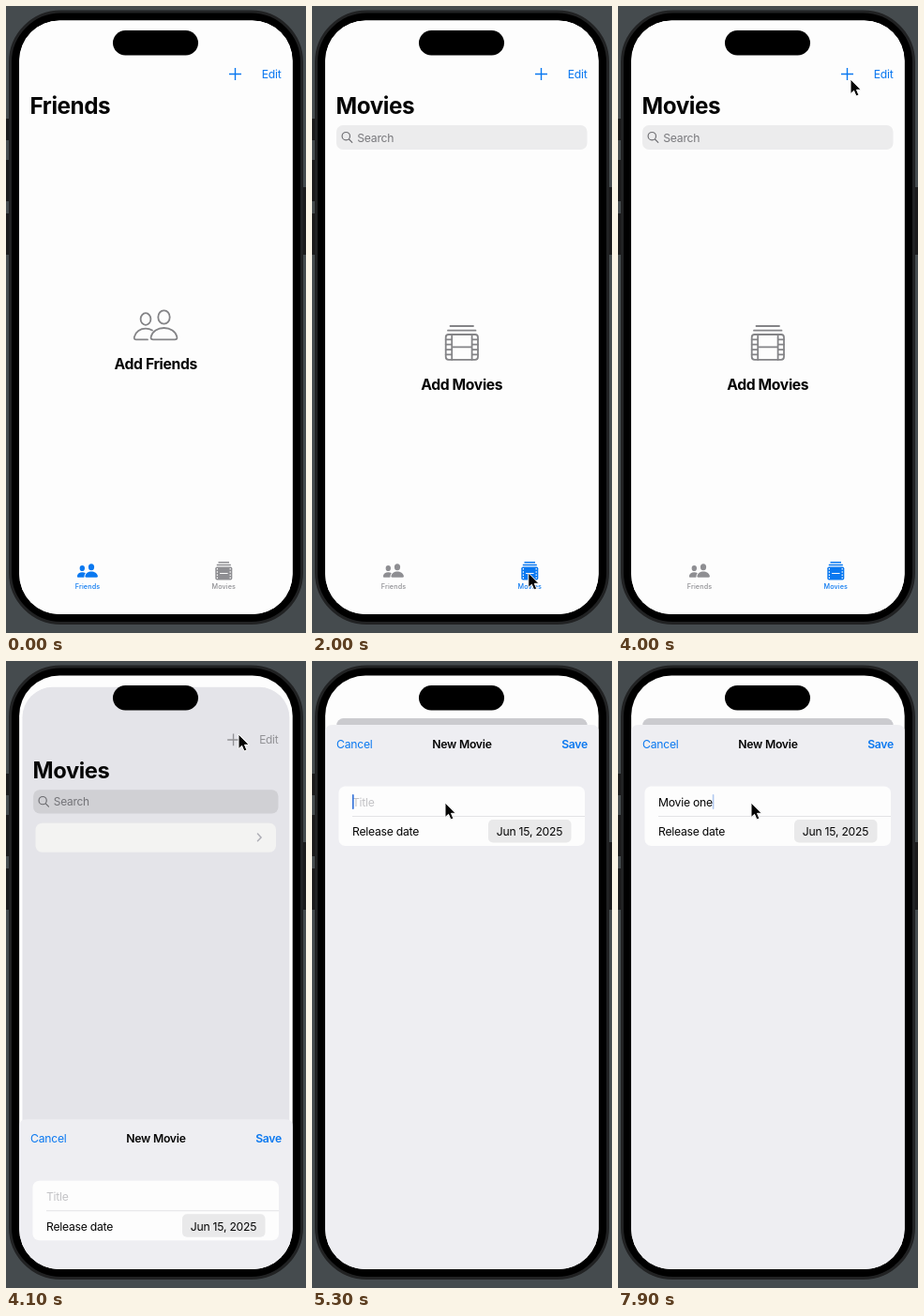
Write an HTML page that moves like this. It is 320x668 px and loops after 8000 ms.

```html
<!DOCTYPE html>
<html lang="en">
<head>
<meta charset="utf-8">
<title>Movie list</title>
<style>
  html, body { margin: 0; width: 100%; height: 100%; overflow: hidden; background: #454b4e; }
  svg { display: block; width: 320px; height: 668px; }
  text { font-family: Inter, Roboto, sans-serif; font-size: 12.2px; letter-spacing: -.25px; fill: #050505; white-space: pre; }
  .title { font-size: 24.3px; font-weight: 700; letter-spacing: -.45px; }
  .empty { font-size: 15.7px; font-weight: 700; letter-spacing: -.35px; text-anchor: middle; }
  .tab { font-size: 7.2px; font-weight: 500; letter-spacing: .12px; text-anchor: middle; fill: inherit; }
  .bold { font-weight: 600; }
  .mid { text-anchor: middle; }
  .end { text-anchor: end; }
  .link { fill: #0a78f0; }
  .line { fill: none; stroke: #848487; stroke-width: 1.8; stroke-linecap: round; stroke-linejoin: round; }
</style>
</head>
<body>
<svg viewBox="0 0 320 668">
  <defs>
    <clipPath id="screen"><rect x="14.1" y="15.5" width="291.6" height="632.5" rx="43"/></clipPath>
  </defs>

  <rect width="320" height="668" fill="#454b4e"/>
  <g fill="#1b1b1c">
    <rect y="120" width="6" height="23"/>
    <rect y="164" width="6" height="44"/>
    <rect y="221" width="6" height="44"/>
    <rect x="314" y="193" width="6" height="72"/>
  </g>
  <rect x="4.5" y="6" width="311" height="651.5" rx="54" fill="#000" stroke="#212223" stroke-width="3"/>

  <g clip-path="url(#screen)">
    <rect x="14" y="15" width="292" height="636" fill="#fdfdfd"/>
    <g id="home">
      <rect id="card" x="14.1" y="15" width="291.6" height="640"/>
      <g id="tools">
        <path d="M238 72.5h13M244.5 66v13" stroke="currentColor" stroke-width="1.4"/>
        <text x="293.5" y="77" class="end" style="fill:currentColor">Edit</text>
      </g>
      <text id="heading" class="title" x="25.5" y="115"></text>

      <g id="friends">
        <g class="line">
          <ellipse cx="168.5" cy="331.5" rx="6.2" ry="7.2"/>
          <path d="M157 355.4q-3 0-2.3-3c1.3-6 7.3-9.4 13.8-9.4s12.5 3.4 13.8 9.4q.7 3-2.3 3z"/>
          <ellipse cx="149" cy="333.5" rx="5.4" ry="6.3"/>
          <path d="M151 355.4H139q-2.8 0-2.1-3c1.3-5.6 6.4-8.7 12.1-8.7 2.7 0 5 .6 7 1.8"/>
        </g>
        <text class="empty" x="159.7" y="387">Add Friends</text>
      </g>

      <g id="movies">
        <rect id="search" x="26" y="127" width="267.5" height="26" rx="7"/>
        <g fill="none" stroke="#707074" stroke-width="1.2" stroke-linecap="round">
          <circle cx="36.3" cy="138.7" r="4.2"/>
          <path d="M39.5 142l3.300 3.400"/>
        </g>
        <text x="48.3" y="144.5" style="fill:#78787c">Search</text>
        <g id="none">
          <g class="line">
            <path d="M147.5 341h24.5M145 345.7h29.5"/>
            <rect x="142.7" y="350" width="34.3" height="26.8" rx="3"/>
            <path id="film"/>
          </g>
          <text class="empty" x="159.7" y="409">Add Movies</text>
        </g>
        <g id="row">
          <rect x="28.5" y="163.5" width="262.5" height="31.5" rx="7" fill="#fefefd"/>
          <path d="M271 175l3.7 3.9-3.7 3.9" fill="none" stroke="#b6b6be" stroke-width="1.5" stroke-linecap="round"/>
        </g>
      </g>

      <g id="tabFriends">
        <ellipse cx="91" cy="597.7" rx="3.1" ry="3.5"/>
        <path d="M85.8 608.8q-1.5 0-1.3-1.5c.5-3 3.2-4.7 6.5-4.7s6.3 1.7 6.8 4.7q.2 1.5-1.3 1.5z"/>
        <ellipse cx="81.3" cy="599" rx="2.7" ry="3.1"/>
        <path d="M83.3 608.8H77q-1.3 0-1.1-1.5c.5-2.6 2.6-4 5.4-4q2 0 3.5.9-1.7 1.8-1.5 4.6z"/>
        <text class="tab" x="87" y="620.8">Friends</text>
      </g>
      <g id="tabMovies">
        <path d="M226.5 592h11.5v1.4h-11.5zM224.8 594.7h15v1.5h-15z"/>
        <rect x="223.3" y="597.5" width="18" height="14" rx="1.8"/>
        <path d="M228 604.5h8.6" stroke="#fdfdfd" stroke-width="1"/>
        <path d="M225.4 599v11.5M239.2 599v11.5" stroke="#fdfdfd" stroke-width="1.2" stroke-dasharray="1.5 1.7"/>
        <text class="tab" x="232.3" y="620.8">Movies</text>
      </g>
      <rect id="dim" x="14.1" y="15" width="291.6" height="640"/>
    </g>

    <g id="sheet">
      <path d="M14 700V8q0-8 8-8h276q8 0 8 8v692z" fill="#eeeef2"/>
      <text class="link" x="26" y="24.8">Cancel</text>
      <text class="bold mid" x="160" y="24.8">New Movie</text>
      <text class="bold end link" x="294" y="24.8">Save</text>
      <rect x="28.5" y="65.5" width="262.5" height="63.5" rx="7" fill="#fdfdfd"/>
      <path d="M43 97.5h248" stroke="#dedee1" stroke-width=".8"/>
      <text id="entry" x="43" y="86.5"></text>
      <rect id="caret" y="74" width="1.6" height="16" rx=".8" fill="#2f6fd8"/>
      <text x="43" y="118.3">Release date</text>
      <rect x="188" y="101" width="88.5" height="24.5" rx="5" fill="#e9e9ea"/>
      <text class="mid" x="232" y="118.3">Jun 15, 2025</text>
    </g>
  </g>

  <rect x="114" y="26" width="91" height="26.5" rx="13.25"/>
  <path id="pointer" d="M0 0V15.6L3.6 12.3 6 18 8.9 16.8 6.5 11.3H11.2Z" fill="#050505" stroke="#fdfdfd" stroke-width="1"/>
</svg>

<script>
const LOOP = 8000, TAB_AT = 1600, SHEET_AT = 4044, FOCUS_AT = 5300;
const BLUE = '#0a78f0', GREY = '#8e8e92';
const keys = [
  [600, 175, 672], [1100, 215, 613], [1450, 230, 604], [2100, 231, 604],
  [3200, 246, 134], [3700, 248, 78], [4350, 248, 78], [5150, 142, 151]
];
const typing = [6400, 6500, 6600, 6700, 6800, 7200, 7200, 7300, 7400];
const word = 'Movie one';

const $ = id => document.getElementById(id);
const set = (id, attrs) => {
  for (const name in attrs) $(id).setAttribute(name, attrs[name]);
};
const show = (id, on) => { $(id).style.display = on ? '' : 'none'; };
const clamp = v => Math.max(0, Math.min(1, v));

let film = 'M149.2 350v26.8M170.6 350v26.8M149.2 363.4h21.4';
for (let i = 1; i < 5; i++) {
  const y = 350 + i * 5.36;
  film += `M142.7 ${y}h6.5M170.6 ${y}h6.4`;
}
set('film', { d: film });

// Critically damped spring
function spring(ms) {
  const x = Math.max(0, ms) * .0182;
  return 1 - (1 + x) * Math.exp(-x);
}

// Speed through a key: harmonic mean of both sides, zero at a turn or rest
function speed(i, axis) {
  if (i === 0 || i === keys.length - 1) return 0;
  const slope = j => (keys[j + 1][axis] - keys[j][axis]) / (keys[j + 1][0] - keys[j][0]);
  const a = slope(i - 1), b = slope(i);
  return a * b > 0 ? 2 * a * b / (a + b) : 0;
}

function pointerAt(t) {
  let i = 0;
  while (i < keys.length - 2 && t > keys[i + 1][0]) i++;
  const t0 = keys[i][0], span = keys[i + 1][0] - t0;
  const u = clamp((t - t0) / span), v = 1 - u;
  return [1, 2].map(axis =>
    keys[i][axis] * v * v * (1 + 2 * u) + keys[i + 1][axis] * u * u * (3 - 2 * u) +
    span * u * v * (speed(i, axis) * v - speed(i + 1, axis) * u));
}

// The caret rests solid, then fades out and in once per second
function caretAlpha(idle) {
  const ms = idle % 1000;
  return 1 - clamp((ms - 280) / 350) + clamp((ms - 780) / 220);
}

function render(t) {
  const movies = t >= TAB_AT, open = t >= SHEET_AT;
  const p = spring(t - SHEET_AT), s = 1 - .083 * p;

  $('heading').textContent = movies ? 'Movies' : 'Friends';
  show('friends', !movies);
  show('movies', movies);
  show('none', !open);
  show('row', open);
  set('tabFriends', { fill: movies ? GREY : BLUE });
  set('tabMovies', { fill: movies ? BLUE : GREY });
  set('tools', { color: open ? '#98989c' : BLUE });
  set('search', { fill: open ? '#d9d9de' : '#ececed' });
  set('card', { fill: open ? '#eeeef3' : '#fdfdfd', rx: 43 - 35 * p });
  set('dim', { opacity: .15 * p, rx: 43 - 35 * p });
  set('home', { transform: `translate(${160 - 160 * s} ${15 + 46 * p - 15 * s}) scale(${s})` });

  show('sheet', open);
  set('sheet', { transform: `translate(0 ${650 - 582 * p})` });

  const count = typing.filter(at => t >= at).length;
  const entry = $('entry');
  entry.textContent = count ? word.slice(0, count) : 'Title';
  entry.style.fill = count ? '' : '#c3c3c6';
  const width = count ? entry.getComputedTextLength() : 0;
  const lastAct = count ? typing[count - 1] : FOCUS_AT;
  show('caret', t >= FOCUS_AT);
  set('caret', { x: 43 + width, opacity: caretAlpha(t - lastAct) });

  const [x, y] = pointerAt(t);
  show('pointer', t >= keys[0][0]);
  set('pointer', { transform: `translate(${x} ${y})` });
}

function tick(now) {
  render(now % LOOP);
  requestAnimationFrame(tick);
}
render(0);
requestAnimationFrame(tick);
</script>
</body>
</html>
```
